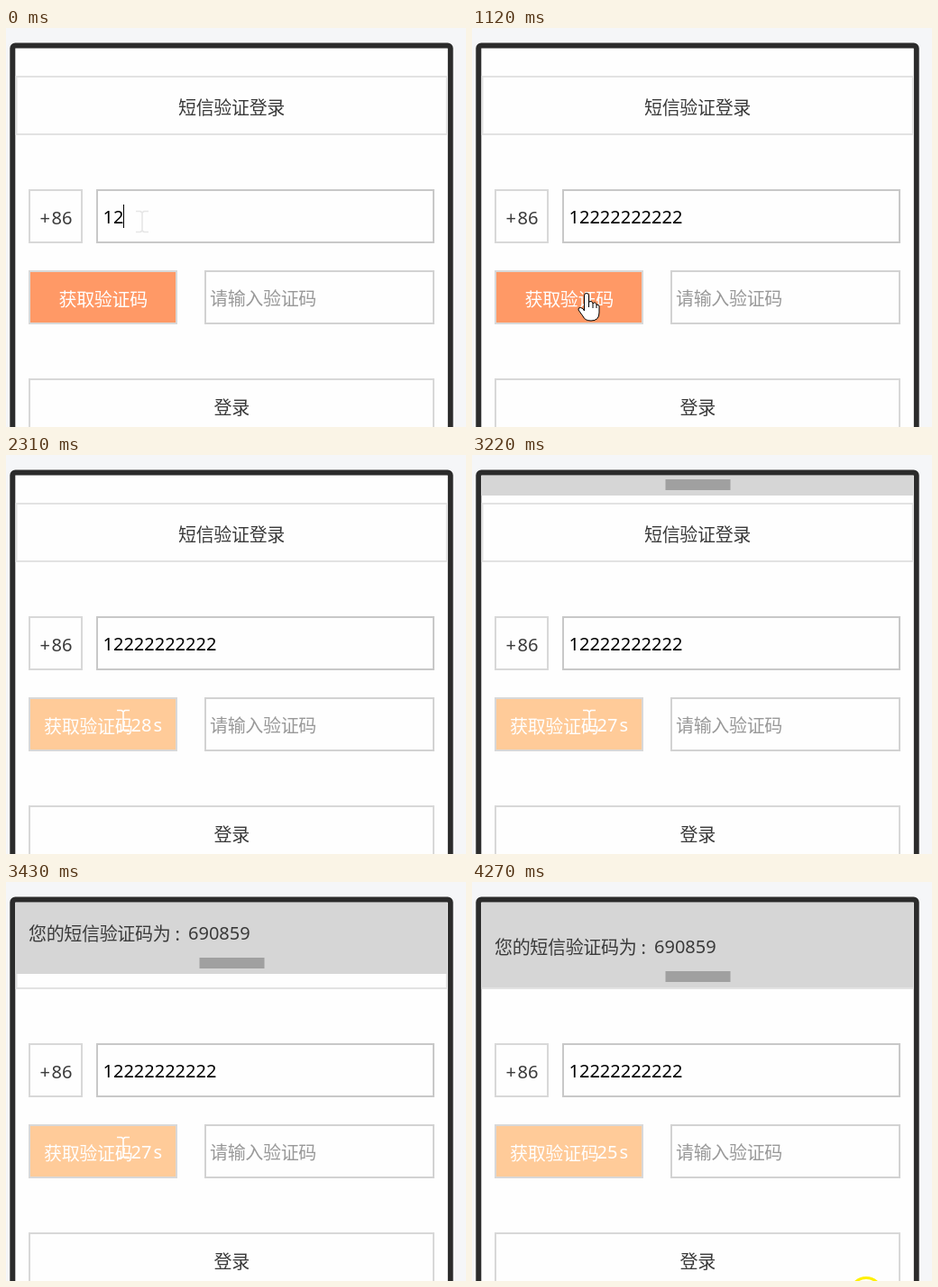
Animation, 510 px wide and 443 px high, one loop 4340 ms. Source, as an HTML page:

```html
<!DOCTYPE html>
<html lang="zh">
<head>
<meta charset="utf-8">
<title>短信验证登录</title>
<style>
html, body { margin: 0; width: 100%; height: 100%; overflow: hidden; background: #f5f6f8; }
svg { display: block; width: 510px; height: 443px; }
text { font: 20px "Noto Sans", "Noto Sans CJK SC", "Noto Sans CJK", sans-serif; fill: #3a3a3a; }
.zh { font-family: "Noto Sans CJK SC", "Noto Sans CJK", sans-serif; letter-spacing: -.33px; }
.box { fill: #fefefe; stroke: #d8d8d8; stroke-width: 2; }
#button text { fill: #fff; }
</style>
</head>
<body>
<svg viewBox="0 0 510 443">
  <defs>
    <clipPath id="screen"><path d="M10 23H489V443H10Z"/></clipPath>
  </defs>
  <rect x="7.300" y="19.600" width="485.400" height="500" rx="3" fill="#fefefe" stroke="#2b2b2b" stroke-width="6"/>
  <path d="M489.5 23V443" stroke="#ddd"/>

  <rect class="box" x="11.500" y="54" width="477.300" height="64" style="stroke:#e2e2e2"/>
  <text class="zh" x="191" y="96">短信验证登录</text>

  <rect class="box" x="26" y="180" width="58" height="58"/>
  <text x="37.500" y="218">+</text>
  <text x="50.500" y="218">86</text>

  <rect class="box" x="101" y="180" width="373" height="58" style="stroke:#c8c8c8"/>
  <text id="phone" x="107.5" y="217" style="fill:#000"></text>
  <rect id="caret" y="196" width="1" height="26"/>

  <g id="button">
    <rect id="face" class="box" x="26" y="270" width="163" height="58"/>
    <text id="label" class="zh" y="309">获取验证码</text>
    <text id="count" x="138.5" y="307"></text>
    <text id="unit" x="163.5" y="307">s</text>
  </g>

  <rect class="box" x="221" y="270" width="253" height="58" style="stroke:#d2d2d2"/>
  <text class="zh" x="226" y="308" style="fill:#999">请输入验证码</text>

  <rect class="box" x="26" y="390" width="448" height="70"/>
  <text class="zh" x="230.5" y="429">登录</text>

  <g clip-path="url(#screen)">
    <g id="banner">
      <rect x="10" y="-100" width="479" height="100" fill="#d6d6d6"/>
      <text class="zh" x="25" y="-37">您的短信验证码为</text>
      <text x="187.500" y="-37">:</text>
      <text x="202" y="-38">690859</text>
      <rect x="214.500" y="-18" width="72" height="12" fill="#a0a0a0"/>
    </g>
  </g>

  <path id="beam" d="M-7 -11.5H-2L0 -10L2 -11.5H7M0 -10V10M-7 11.5H-2L0 10L2 11.5H7" fill="none" stroke-width="1.600"/>
  <path id="arrow" d="M0 0V19L4.5 15L8 22.5L11 21L7.700 14H13.500Z" fill="#fff" stroke="#000"/>
  <g id="hand" fill="#fff" stroke="#000" stroke-linejoin="round">
    <path d="M-2.500 18V3Q-2.500 .5 0 .5T2.500 3V11Q3 9 5 9.500T7 12Q8 10.500 9.500 11T11 13.500Q13.500 12 14 15V22Q14 31 5 31Q-2 31 -4 26L-9 19Q-9.500 16 -6.500 16.500T-2.500 20Z"/>
    <path d="M2.500 11V16M7 12V17M11 13.500V17" fill="none"/>
  </g>
  <circle id="ring" cx="437" cy="457" r="17.500" fill="none" stroke="#fff000" stroke-width="3"/>
</svg>
<script>
const LOOP = 4340, STEP = 70;
const NUMBER = '12222222222';
const DROP = [22, 44, 65, 79, 88, 93, 94];
const $ = id => document.getElementById(id);
const show = (id, on) => $(id).style.display = on ? '' : 'none';
const clamp = v => Math.max(0, Math.min(1, v));
const lerp = (a, b, p) => a + (b - a) * p;

// Progress counted in whole steps, the first one at `start`.
const stepped = (t, start, n) => clamp((Math.floor((t - start) / STEP) + 1) / n);

function drawPhone(t) {
  const n = 2 + 9 * stepped(t, 280, 3);
  $('phone').textContent = NUMBER.slice(0, n);
  $('caret').setAttribute('x', Math.floor(107.5 + n * 11.44));
  show('caret', t < 1120);
}

function drawButton(t) {
  const waiting = t >= 1260;
  $('face').style.fill = waiting ? '#ffcb99' : '#ff9966';
  $('label').setAttribute('x', waiting ? 42 : 58.5);
  const ticks = [1400, 2310, 3220, 3920, 4200];
  $('count').textContent = 30 - ticks.filter(k => t >= k).length;
  show('count', waiting);
  show('unit', waiting);
}

function drawBanner(t) {
  const i = Math.floor((t - 3220) / STEP);
  show('banner', i >= 0);
  if (i >= 0) $('banner').setAttribute('transform', `translate(0 ${23 + DROP[Math.min(i, 6)]})`);
}

function drawCursor(t) {
  let x, y, kind;
  if (t < 1330) {
    const p = stepped(t, 840, 5);
    x = lerp(151, 127, p);
    y = lerp(215, 294, p);
    kind = y < 239 ? 'beam' : y < 269 ? 'arrow' : 'hand';
  } else {
    const p = stepped(t, 3920, 6);
    x = lerp(130, 437, p);
    y = lerp(295, 457, p);
    kind = y < 328 ? 'beam' : 'arrow';
  }
  for (const id of ['beam', 'arrow', 'hand']) show(id, id === kind);
  $(kind).setAttribute('transform', `translate(${x} ${y})`);
  $('beam').setAttribute('stroke', t < 1260 ? '#e6e6e6' : '#fff');
  show('ring', t >= 4270);
}

function draw(t) {
  drawPhone(t);
  drawButton(t);
  drawBanner(t);
  drawCursor(t);
}

const begin = performance.now();
function tick() {
  draw((performance.now() - begin) % LOOP);
  requestAnimationFrame(tick);
}
draw(0);
requestAnimationFrame(tick);
</script>
</body>
</html>
```
